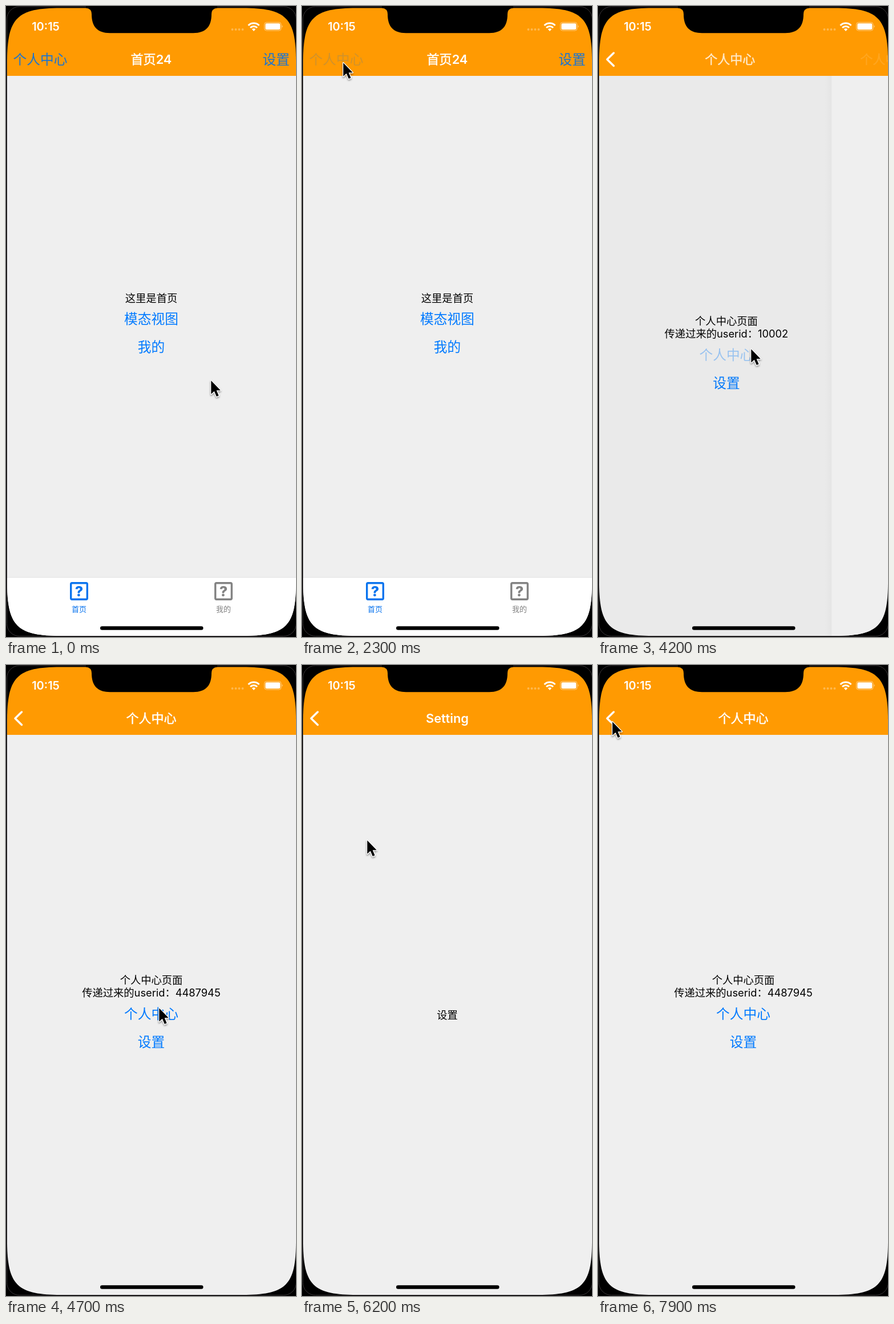
An HTML page that plays this animation: 508x1102 px, repeating every 8000 ms.

```html
<!DOCTYPE html>
<html lang="zh-CN">
<head>
<meta charset="utf-8">
<title>Stack navigation</title>
<style>
  html, body { margin: 0; width: 100%; height: 100%; overflow: hidden; background: #000; }
  svg { display: block; }
  text {
    font-family: Inter, "Noto Sans CJK SC", "Noto Sans CJK", sans-serif;
    font-size: 18.3px;
    text-anchor: middle;
  }
  .link { font-size: 23.7px; fill: #007aff; }
  .title { font-size: 22px; font-weight: 500; fill: #fff; stroke: #fff; stroke-width: .5px; }
  .title .latin { font-size: 21.8px; font-weight: 600; stroke: none; }
  .bar { fill: #1874d4; }
  .tab text { font-size: 13px; }
  .tab .mark { font-size: 25px; font-weight: 800; }
</style>
</head>
<body>
<svg width="508" height="1102" viewBox="0 0 508 1102">
  <defs>
    <clipPath id="screen">
      <path d="M2 97.5C2 20.5 19 3.5 96 3.5H414C491 3.5 508 20.5 508 97.5V1006C508 1083 491 1100 414 1100H96C19 1100 2 1083 2 1006Z"/>
    </clipPath>
    <clipPath id="body"><rect x="2" y="122" width="506" height="978"/></clipPath>
    <linearGradient id="edge">
      <stop offset="0" stop-opacity="0"/>
      <stop offset="1" stop-opacity=".025"/>
    </linearGradient>
    <filter id="soft" x="-50%" y="-50%" width="200%" height="200%">
      <feDropShadow dx="0" dy="2" stdDeviation="1.5" flood-opacity=".4"/>
    </filter>
  </defs>

  <rect width="508" height="1102"/>
  <rect x="1.5" y="1" width="507" height="1099.5" rx="22" fill="none" stroke="#3a3638"/>

  <g clip-path="url(#screen)">
    <g id="pages" clip-path="url(#body)"></g>
    <rect x="2" y="3" width="506" height="119" fill="#ff9a02"/>
    <g id="titles"></g>
    <g id="buttons">
      <text id="left" class="link bar" x="60" y="102">个人中心</text>
      <text class="link bar" x="473.3" y="102">设置</text>
    </g>
    <path id="back" d="M27.5 82L16 93.2L27.5 104.5" fill="none" stroke="#fff"
      stroke-width="3.5" stroke-linecap="round" stroke-linejoin="round"/>

    <text x="69.5" y="43" style="font-size:20px;font-weight:600" fill="#fff">10:15</text>
    <g fill="#fff" opacity=".3">
      <circle cx="396.5" cy="41" r="2"/><circle cx="402.5" cy="41" r="2"/>
      <circle cx="408.5" cy="41" r="2"/><circle cx="414.5" cy="41" r="2"/>
    </g>
    <g fill="none" stroke="#fff" stroke-width="3">
      <path d="M424.5 34A13.5 13.5 0 0 1 443.5 34M428 38A8.5 8.5 0 0 1 440 38"/>
      <path d="M434 44L430.8 40.6A4.6 4.6 0 0 1 437.2 40.6Z" fill="#fff" stroke="none"/>
    </g>
    <rect x="452.5" y="28.5" width="29.5" height="14.5" rx="4" fill="none" stroke="#fff" stroke-opacity=".5"/>
    <rect x="454.3" y="30.3" width="26" height="11" rx="2.4" fill="#fff"/>
    <path d="M483.5 33.5Q486 35.7 483.5 38Z" fill="#fff" opacity=".5"/>

    <rect x="165" y="1083.2" width="180.5" height="6.6" rx="3.3"/>
  </g>

  <path d="M140 0V3.5Q150 4.5 150 14C150 36 160 47.2 182 47.2H328C350 47.2 360 36 360 14Q360 4.5 370 3.5V0Z"/>
  <path id="cursor" d="M0 0V23.5L5.5 18.5L9.5 27.8L13.3 26.2L9.4 17H16.5Z" stroke="#fff"
    stroke-width="2.6" stroke-linejoin="round" paint-order="stroke" filter="url(#soft)"/>
</svg>

<script>
const LOOP = 8000, WIDTH = 506, MID = 254.5;
const OPEN = [2340, 4156, 5590], BACK = 7150;
const $ = id => document.getElementById(id);

const label = (y, str, cls = '', id = '') =>
  `<text x="${MID}" y="${y}" class="${cls}" id="${id}">${str}</text>`;

const tab = (x, str, color) => `
  <g class="tab" fill="${color}">
    <rect x="${x - 14.3}" y="1007.7" width="28.6" height="28.6" rx="2" fill="none" stroke="${color}" stroke-width="3.4"/>
    <text class="mark" x="${x}" y="1031">?</text>
    <text x="${x}" y="1057.5">${str}</text>
  </g>`;

const profile = (userid, key) =>
  label(557, '个人中心页面') + label(579, '传递过来的userid：' + userid) +
  label(617.5, '个人中心', 'link', 'profile' + key) +
  label(666.5, '设置', 'link', 'setting' + key);

const views = [
  ['首页<tspan class="latin">24</tspan>',
    label(517, '这里是首页') + label(555, '模态视图', 'link') + label(604, '我的', 'link') +
    '<rect x="2" y="998" width="506" height="102" fill="#fff"/>' +
    '<path d="M2 998H508" stroke="#e2e2e2"/>' +
    tab(128, '首页', '#0a74ee') + tab(381, '我的', '#828282')],
  ['个人中心', profile('10002', 1)],
  ['个人中心', profile('4487945', 2)],
  ['<tspan class="latin">Setting</tspan>', label(617.5, '设置')]
];

$('pages').innerHTML = views.map(([, content]) => `
  <g>
    <rect x="-10" y="122" width="12" height="978" fill="url(#edge)"/>
    <rect x="2" y="122" width="506" height="978" fill="#efefef"/>
    ${content}
    <rect class="dim" x="2" y="122" width="506" height="978"/>
  </g>`).join('');
$('titles').innerHTML = views.map(([title]) => label(101.3, title, 'title')).join('');

const pages = [...$('pages').children];
const titles = [...$('titles').children];

const ease = {
  in: u => u ** 1.7,
  out: u => 1 - (1 - u) ** 2,
  both: u => u * u * (3 - 2 * u),
  line: u => u
};

// Each step: time, x, y, easing used to reach it
const path = [
  [0, 358, 653], [700, 358, 653], [1950, 71, 98, 'both'], [2750, 71, 98],
  [3200, 223, 442, 'in'], [3750, 267, 598, 'out'], [4800, 267, 598],
  [5350, 253, 650, 'both'], [5800, 253, 650], [6200, 113, 305, 'both'],
  [6400, 113, 305], [6950, 24, 98, 'both'], [LOOP, 24, 98]
];

function pointer(t) {
  const i = path.findIndex(step => step[0] > t);
  const [t0, x0, y0] = path[i - 1], [t1, x1, y1, mode = 'line'] = path[i];
  const u = ease[mode]((t - t0) / (t1 - t0));
  return [x0 + (x1 - x0) * u, y0 + (y1 - y0) * u];
}

const clamp = v => Math.max(0, Math.min(1, v));

// Critically damped slide, settled after 450 ms
function spring(ms) {
  if (ms <= 0) return 0;
  if (ms >= 450) return 1;
  const k = ms * 0.018;
  return 1 - (1 + k) * Math.exp(-k);
}

// Touch feedback: fade to 20 %, then recover after the tap
function press(t, tap) {
  const d = t - tap;
  return d < 0 ? Math.max(0.2, 1 - 0.8 * clamp((d + 150) / 90)) : 0.2 + 0.8 * clamp(d / 250);
}

const move = (el, x, y = 0) => el.setAttribute('transform', `translate(${x} ${y})`);
const fade = (el, v) => el.setAttribute('opacity', v);

function draw(t) {
  const depth = OPEN.reduce((sum, at) => sum + spring(t - at), 0) - spring(t - BACK);

  pages.forEach((page, i) => {
    const d = depth - i;
    const shown = d > -1 && d < 1;
    page.style.display = titles[i].style.display = shown ? '' : 'none';
    if (!shown) return;
    move(page, -d * WIDTH * (d < 0 ? 1 : 0.3));
    fade(page.querySelector('.dim'), 0.11 * clamp(d));
    move(titles[i], -d * (d < 0 ? 309 : 119));
    fade(titles[i], clamp(d < 0 ? 1 + 1.1 * d : 1 - 1.1 * d));
  });

  fade($('buttons'), clamp(1 - 1.3 * depth));
  fade($('left'), press(t, OPEN[0]));
  fade($('profile1'), press(t, OPEN[1]));
  fade($('setting2'), press(t, OPEN[2]));
  fade($('back'), clamp(depth) * press(t, BACK));

  const [x, y] = pointer(t);
  move($('cursor'), x + 1.3, y + 1.3);
}

const start = performance.now();
function tick() {
  draw((performance.now() - start) % LOOP);
  requestAnimationFrame(tick);
}
tick();
</script>
</body>
</html>
```
